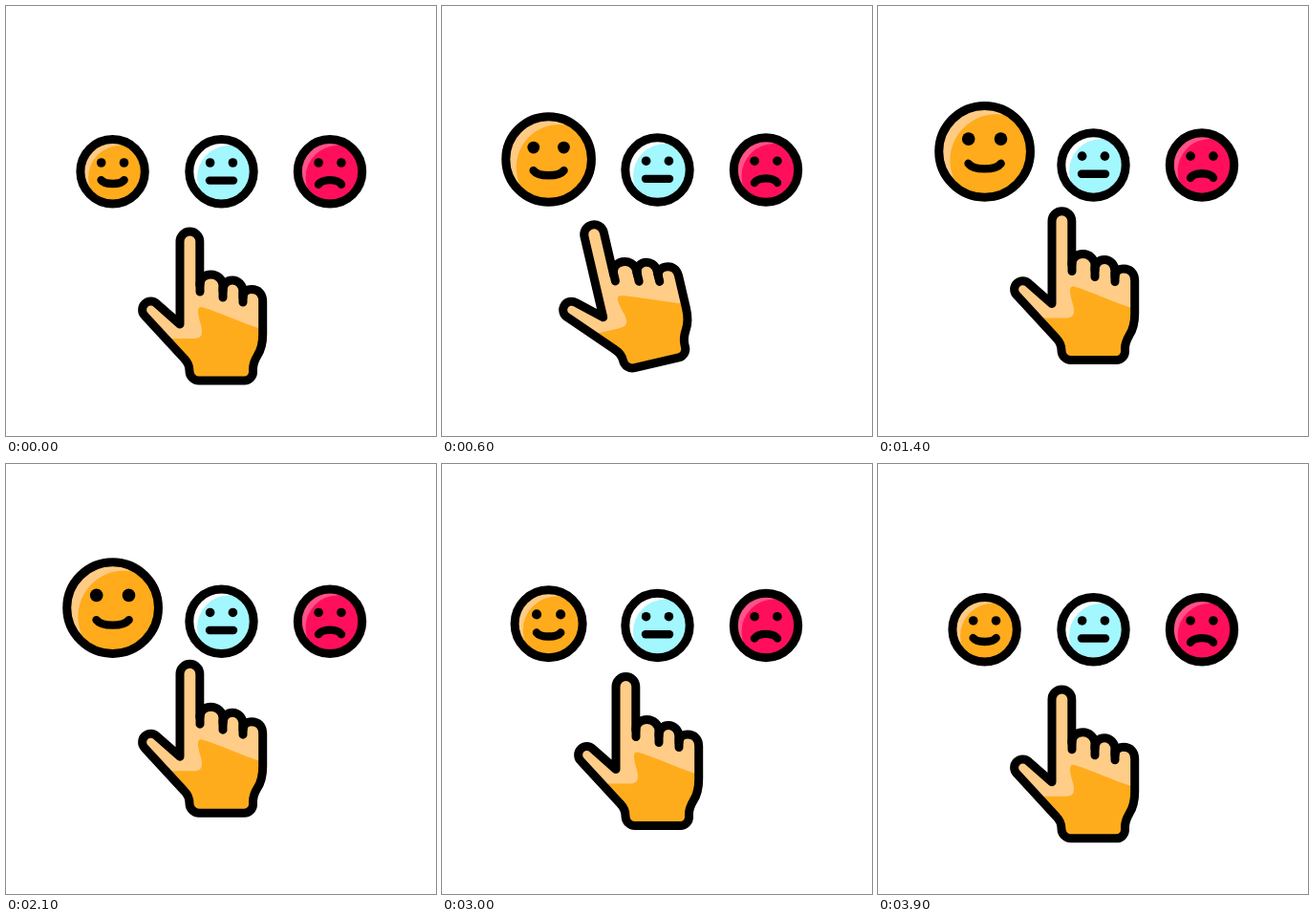
An HTML page for the animation above (4000 ms loop, 450 px wide and 450 px high).

```html
<!DOCTYPE html>
<html lang="en">
<head>
<meta charset="utf-8">
<title>Rating</title>
<style>
  html, body { margin: 0; width: 100%; height: 100%; overflow: hidden; background: #fff; }
  svg { display: block; width: 100vw; height: 100vh; }
  .line {
    fill: none; stroke: #000; stroke-width: 9;
    stroke-linecap: round; stroke-linejoin: round;
    vector-effect: non-scaling-stroke;
  }
  .mouth { stroke-width: 8.400; }
</style>
</head>
<body>
<svg viewBox="0 0 450 450">
  <defs>
    <clipPath id="disc"><circle r="33.700"/></clipPath>
    <path id="palm" d="M182 333V246.500a10.400 10.400 0 0 1 20.800 0V292C203 285 208 281 214.500 281S227 286 227 293V298C227 291 231 287 237 287S248 292 248 299V305C248 299 252 296.500 257 296.500C264 296.500 268.700 301 268.700 309V343C268.700 354 267 360 263 366C260 371 258.500 375 258.500 380V383A9 9 0 0 1 249.500 392H202A10 10 0 0 1 192 382Q192 374.500 186.500 369L145.200 324.200A8.800 8.800 0 0 1 157.800 311.700Z"/>
    <clipPath id="inPalm"><use href="#palm"/></clipPath>
  </defs>
  <g id="faces"></g>
  <g id="hand">
    <use href="#palm" fill="#ffcd88"/>
    <path clip-path="url(#inPalm)" fill="#ffac1c" d="M170 348H196C206 348 206 342 204 334C201 324 199 315 204 315C212 316 243 330 272 340V400H170Z"/>
    <use href="#palm" class="line"/>
    <path class="line" d="M203 290V299M227 295V305M248 300V310"/>
  </g>
</svg>
<script>
const LOOP = 4000, STEP = 100;
const BASE = 173.3, RADIUS = 33.7, GROWTH = 0.42;
const PRESSES = [400, 2500], HALF = 400;
const GROW = 110, SHRINK = 2462, BOUNCE = 800;

const faces = [
  { x: 111.6, fill: '#ffab1b', light: '#ffcb84', mouth: 'M-12 8.800C-8 14 8 14 12 8.800' },
  { x: 225.5, fill: '#a3f7ff', light: '#ffffff', mouth: 'M-12.500 9.300H12.500' },
  { x: 339, fill: '#ff0f5b', light: '#ff5288', mouth: 'M-12 13.500C-8 7.300 8 7.300 12 13.500' }
];

const group = document.getElementById('faces');
const hand = document.getElementById('hand');

group.innerHTML = faces.map(f => `<g>
  <circle r="33.700" fill="${f.light}"/>
  <circle cx="8.500" cy="6.500" r="34" fill="${f.fill}" clip-path="url(#crop)"/>
  <circle class="line" r="33.700"/>
  <circle cx="-11.900" cy="-9.300" r="4.800"/>
  <circle cx="11.900" cy="-9.300" r="4.800"/>
  <path class="line mouth" d="${f.mouth}"/>
</g>`.replace('<circle cx="8.500"', '<g clip-path="url(#disc)"><circle cx="8.500"')
     .replace(' clip-path="url(#crop)"/>', '/></g>')).join('');

const clamp = v => Math.min(1, Math.max(0, v));

function bounceOut(u) {
  const k = 7.5625, d = 2.75;
  if (u < 1 / d) return k * u * u;
  if (u < 2 / d) return k * (u - 1.5 / d) ** 2 + 0.75;
  if (u < 2.5 / d) return k * (u - 2.25 / d) ** 2 + 0.9375;
  return k * (u - 2.625 / d) ** 2 + 0.984375;
}

const bounce = (t, start) => bounceOut(clamp((t - start) / BOUNCE));

function pressAt(t) {
  const gap = Math.min(...PRESSES.map(p => Math.abs(t - p)));
  return 0.5 + 0.5 * Math.cos(Math.PI * clamp(gap / HALF));
}

function draw(t) {
  const rise = 1 - Math.cos(2 * Math.PI * t / LOOP);

  // The first face grows from its lowest point
  const grown = 1 + GROWTH * (bounce(t, GROW) - bounce(t, SHRINK));
  const y = BASE - 4.3 * rise;
  faces.forEach((f, i) => {
    const s = i ? 1 : grown;
    group.children[i].setAttribute('transform',
      `translate(${f.x} ${y + RADIUS * (1 - s)}) scale(${s})`);
  });

  // The hand tilts around the wrist, then jabs upwards
  const p = pressAt(t), jab = p ** 3.2;
  hand.setAttribute('transform',
    `translate(${5 * jab} ${-13.5 * rise - 68 * jab}) rotate(${-33.5 * p ** 1.35} 200 396)`);
}

function tick() {
  const t = performance.now() % LOOP;
  draw(Math.floor(t / STEP) * STEP);
  requestAnimationFrame(tick);
}

draw(0);
requestAnimationFrame(tick);
</script>
</body>
</html>
```
